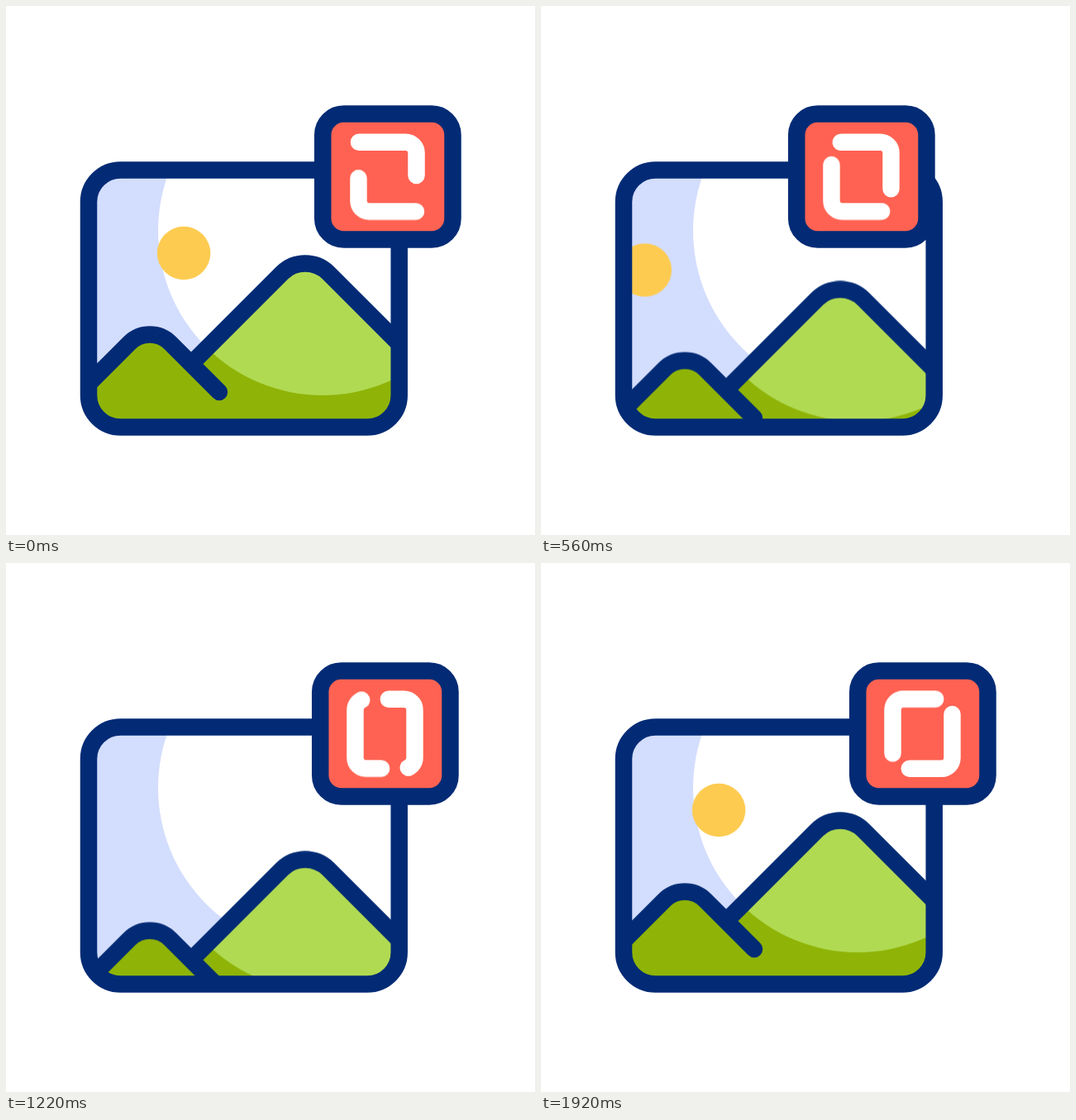
Recreate the animation shown at these times as an HTML page. Size 640 px wide and 640 px high, loop 3000 ms.

```html
<!DOCTYPE html>
<html lang="en">
<head>
<meta charset="utf-8">
<title>Image swap icon</title>
<style>
  :root {
    --navy: #032b75;
    --smooth: cubic-bezier(.333, 0, .667, 1);
  }
  html, body { margin: 0; width: 100%; height: 100%; overflow: hidden; background: #fff; }
  svg { display: block; width: 100%; height: 100%; }

  .outline { fill: none; stroke: var(--navy); stroke-width: 20.5; stroke-linecap: round; stroke-linejoin: round; }
  .arrow { fill: none; stroke: #fff; stroke-width: 20.5; stroke-linecap: round; stroke-linejoin: round; }

  .sun, .hills, .badge, .still, .head, .ring { animation: 3s var(--smooth) infinite; }
  .sun { animation-name: orbit; transform-origin: 208.6px 475.7px; }
  .hills { animation-name: sink; }
  .badge { animation-name: slide; }
  .still { animation-name: rest; animation-timing-function: step-end; }
  .head { animation-name: pop; transform-box: fill-box; transform-origin: center; }
  .ring { animation-name: run, spin; animation-timing-function: step-end, var(--smooth); stroke-dasharray: 112 177.7; }

  @keyframes orbit {
    0% { transform: rotate(0deg); animation-timing-function: cubic-bezier(.58, -.106, .385, 1); }
    64.67%, 100% { transform: rotate(-360deg); }
  }
  @keyframes sink {
    0% { transform: translateY(0); }
    32.8%, 35.2% { transform: translateY(52px); }
    64.67%, 100% { transform: translateY(0); }
  }
  @keyframes slide {
    0% { transform: translateX(0); }
    21.33% { transform: translateX(-77.3px); }
    43.33%, 100% { transform: translateX(0); }
  }
  @keyframes rest {
    0% { opacity: 1; }
    2.667% { opacity: 0; }
    42.667%, 100% { opacity: 1; }
  }
  @keyframes run {
    0% { opacity: 0; }
    2.667% { opacity: 1; }
    42.667%, 100% { opacity: 0; }
  }
  @keyframes spin {
    0%, 2.667% { stroke-dashoffset: 10; }
    42.667%, 100% { stroke-dashoffset: -279.7; }
  }
  @keyframes pop {
    0% { transform: scale(1); }
    2.667%, 42.667% { transform: scale(0); }
    45.33%, 100% { transform: scale(1); }
  }
</style>
</head>
<body>
<svg viewBox="0 0 640 640">
  <defs>
    <clipPath id="pane"><rect x="100" y="198.5" width="375.7" height="311" rx="38.5"/></clipPath>
    <path id="land" d="M60 497L149.3 407.7A35 35 0 0 1 198.7 407.7L224 433L334 323A40 40 0 0 1 390 323L520 453V600H60Z"/>
    <clipPath id="landClip"><use href="#land"/></clipPath>
    <g id="swapArrow">
      <path class="still" d="M427 164.7H483.5A13 13 0 0 1 496.5 177.7V205"/>
      <path class="head" d="M480 199L496 217L512 199"/>
      <path class="ring" pathLength="289.7" d="M438.5 164.7H484.5A13 13 0 0 1 497.5 177.7V235.7A13 13 0 0 1 484.5 248.7H438.5A13 13 0 0 1 425.5 235.7V177.7A13 13 0 0 1 438.5 164.7Z"/>
    </g>
  </defs>

  <g clip-path="url(#pane)">
    <rect x="90" y="188" width="396" height="332" fill="#d3ddfd"/>
    <circle cx="383" cy="272" r="199" fill="#fff"/>
    <circle class="sun" cx="215" cy="299" r="32.3" fill="#fdcb50"/>
    <g class="hills">
      <use href="#land" fill="#8fb407"/>
      <g clip-path="url(#landClip)"><circle cx="383" cy="272" r="199" fill="#b1da53"/></g>
      <path class="outline" d="M60 497L149.3 407.7A35 35 0 0 1 198.7 407.7L258 467M224 433L334 323A40 40 0 0 1 390 323L520 453"/>
    </g>
  </g>
  <rect class="outline" x="100" y="198.5" width="375.7" height="311" rx="38.5"/>

  <g class="badge">
    <rect x="383.2" y="130.5" width="157.3" height="152" rx="25.5" fill="#ff6252" stroke="#032b75" stroke-width="20.5"/>
    <g class="arrow">
      <use href="#swapArrow"/>
      <use href="#swapArrow" transform="rotate(180 461.5 206.7)"/>
    </g>
  </g>
</svg>
</body>
</html>
```
